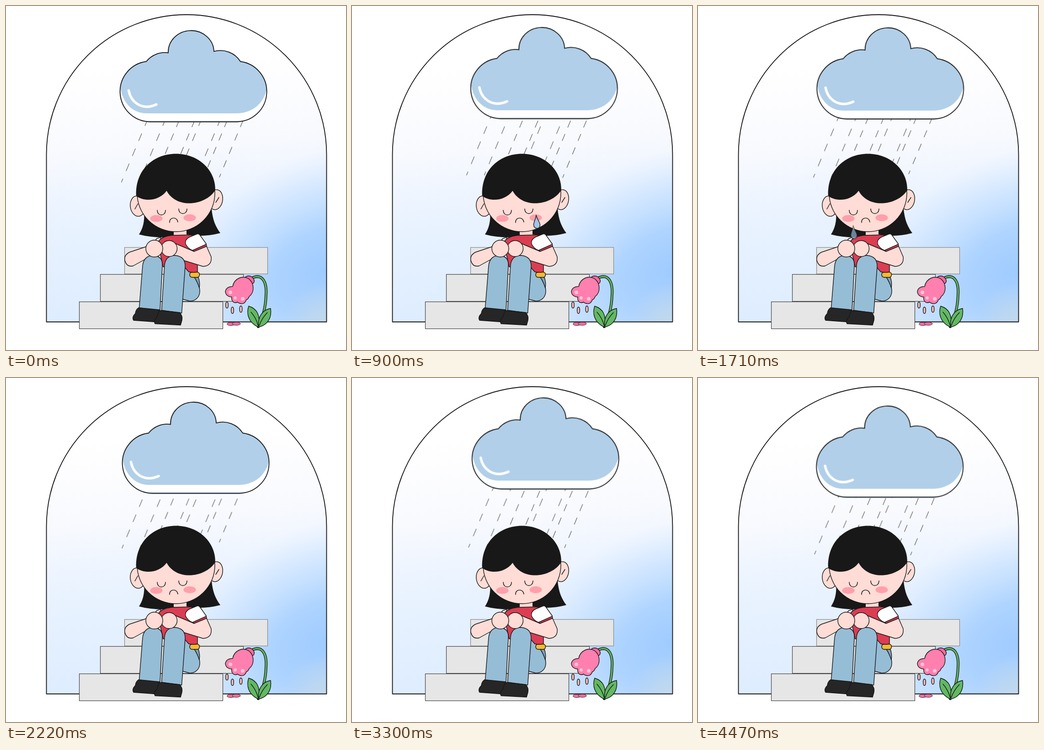
An HTML page that plays this animation: 744 by 753 pixels, repeating every 4.5 s.

```html
<!DOCTYPE html>
<html lang="en">
<head>
<meta charset="utf-8">
<title>Rainy day</title>
<style>
  html, body { margin: 0; width: 100%; height: 100%; overflow: hidden; background: #fff; }
  svg { display: block; width: 744px; height: 753px; }
  .ink { stroke: #161616; stroke-width: 1.4; stroke-linejoin: round; stroke-linecap: round; }
  .bold { stroke-width: 1.8; }
  .line { fill: none; }
  .skin { fill: #ffdcd5; }
  .hair { fill: #181818; }
  .denim { fill: #96bdd6; }
  .red { fill: #dc3d52; }
  .leaf { fill: #62b863; }
  .blush { fill: #ff9fac; }
  .rain { stroke: #777; stroke-width: 1.5; }
  .drop { fill: #9fc6e8; }
</style>
</head>
<body>
<svg viewBox="0 0 744 753">
  <defs>
    <linearGradient id="sky" gradientUnits="userSpaceOnUse" x1="370" y1="120" x2="420" y2="691">
      <stop offset="0" stop-color="#fff"/>
      <stop offset=".3" stop-color="#f9fafe"/>
      <stop offset=".55" stop-color="#eaf3ff"/>
      <stop offset="1" stop-color="#dcecff"/>
    </linearGradient>
    <radialGradient id="glow" gradientUnits="userSpaceOnUse" cx="0" cy="0" r="1"
        gradientTransform="translate(700 580) rotate(-24) scale(370 255)">
      <stop offset="0" stop-color="#9fcbff"/>
      <stop offset=".35" stop-color="#a5cfff" stop-opacity=".85"/>
      <stop offset=".7" stop-color="#b4d7ff" stop-opacity=".42"/>
      <stop offset="1" stop-color="#c4deff" stop-opacity="0"/>
    </radialGradient>
    <radialGradient id="corner" gradientUnits="userSpaceOnUse" cx="701" cy="700" r="95">
      <stop offset="0" stop-color="#c4d9ea"/>
      <stop offset="1" stop-color="#c4d9ea" stop-opacity="0"/>
    </radialGradient>
    <path id="arch" d="M88.5 691.5V325A306.5 306 0 0 1 701.5 325V691.5Z"/>
    <path id="puff" d="M307 121.5A66.3 66.3 0 0 0 315 253.5H506A66.3 66.3 0 0 0 513 121.5A52 52 0 0 0 455 99.5A50 47.2 0 0 0 355 102.5A52 52 0 0 0 307 121.5Z"/>
    <path id="tear" d="M0 0C2 9 8 15 8.5 21C8.5 26 6 29 2.5 29C-2 29-5.5 26-5.5 21C-5.5 15-1 9 0 0Z"/>
    <path id="stem" d="M537 596C561 584 571 604 569 633Q568 670 552 702"/>
  </defs>

  <use href="#arch" fill="url(#sky)"/>
  <use href="#arch" fill="url(#glow)"/>
  <use href="#arch" fill="url(#corner)"/>
  <use href="#arch" class="ink line bold"/>

  <g fill="#e6e6e6" stroke="#444" stroke-width="1.2">
    <rect x="259.5" y="528.5" width="313" height="58" stroke="#888"/>
    <rect x="206.5" y="587.5" width="313" height="59"/>
    <rect x="160.5" y="647.5" width="314" height="59"/>
  </g>

  <g id="rainA" class="rain"></g>
  <g id="rainB" class="rain"></g>

  <g id="cloud">
    <use href="#puff" fill="#b1cfe9"/>
    <path fill="#fff" d="M250 177C255 213 278 235 308 235H503C541 235 565 212 572 177C573 222 545 251.500 506 251.500H315C276 251.500 249 222 250 177Z"/>
    <use href="#puff" class="ink line bold"/>
    <path d="M268.5 185C274 213 300 229 329 215.5" fill="none" stroke="#fff" stroke-width="5.5" stroke-linecap="round"/>
  </g>

  <!-- head -->
  <path class="hair" d="M302 450C304 472 299 488 291 500Q320 508 360 506L395 500Q430 507 469 497C459 484 452 468 450 444Z"/>
  <g class="ink skin">
    <ellipse cx="288" cy="438" rx="16" ry="22.5" transform="rotate(-8 288 438)"/>
    <ellipse cx="459" cy="424" rx="15" ry="22" transform="rotate(9 459 424)"/>
    <path d="M288.500 433L282 444.500M466 432L459 421" class="line" visibility="hidden"/>
    <path d="M288.500 433L282 444.500M466 419L459 430" class="line"/>
    <path d="M367 488H395V508H367Z" stroke="none"/>
    <ellipse cx="372" cy="410" rx="85" ry="84"/>
  </g>
  <path class="hair" d="M285 416C282 360 322 323.5 372 323.5C422 323.5 459 360 458 403C438 436 374 446 351.5 404.5C335 427 303 429 285 416Z"/>
  <g class="blush">
    <ellipse cx="329" cy="465" rx="13.500" ry="7.5"/>
    <ellipse cx="402" cy="463.5" rx="13.5" ry="7.5"/>
  </g>
  <path class="ink line" d="M331 447C331 461 349 461 349 447M378 444C378 458 396 458 396 444M358 474C357 461 375 461 376 473"/>

  <!-- body -->
  <path class="ink denim" d="M384 552C398 578 424 600 424 624C424 638 414 646 402 646L384 641Z"/>
  <path class="ink" fill="#7fa3bd" d="M411 592L421 594Q425 605 423 617Q419 604 411 592Z"/>
  <rect class="ink" x="402" y="582.5" width="21.5" height="11.5" rx="5.5" fill="#f6b931"/>
  <path class="ink" fill="#e9f0fa" d="M323 517L330 509L339 506L336 520Z"/>
  <path class="ink red" d="M332 518Q338 505 362 502L405 501L428 515L419 556V582Q410 584 400 582L392 573L344 571Z"/>
  <path class="ink skin" d="M309 526L270 539Q258 545 260 557Q264 572 278 569L318 547Z"/>
  <path class="ink skin" d="M366 518L411 537L438 524L449 549Q451 569 431 570L360 548Z"/>
  <path class="ink red" d="M406 532L411 537.5L439 526L438 520Z"/>
  <path class="ink" fill="#fff" d="M401 506L418 499Q422 498 424 501L437 519Q438.500 522 435 523L408 535Q398 531 393 521Q391 511 401 506Z"/>
  <g class="ink denim">
    <path d="M291.5 661L299 568Q302 546 323 546Q344 548 342 570L337 666Z"/>
    <path d="M340.5 666L347 566Q350 546 370 546Q393 548 392 571L384.5 672Z"/>
  </g>
  <circle class="ink skin" cx="357" cy="531" r="17.5"/>
  <circle class="ink skin" cx="324.5" cy="531" r="18.5"/>
  <g class="ink" fill="#262626">
    <path d="M290 660.500L336 665L327 691.500L279 688Q275 681 283 673Q284 664 290 660.500Z"/>
    <path d="M338 666.500L380 671Q387 678 385 688L382 698.500L326 695.500Q322 688 331 680Q332 670 338 666.500Z"/>
  </g>

  <!-- flower -->
  <g class="ink">
    <use href="#stem" class="line" style="stroke-width:6"/>
    <use href="#stem" class="line" style="stroke:#62b863;stroke-width:3.4"/>
    <g class="leaf">
      <path d="M552 703C529 692 526 672 531 657C549 662 558 678 552 703Z"/>
      <path d="M553 703C550 681 561 665 579 662C582 682 573 698 553 703Z"/>
      <path class="line" d="M536 670Q547 682 552 700M572 671Q560 683 554 700"/>
    </g>
    <path fill="#f76b9f" d="M523 594Q530 588 538 593Q546 600 542 606Q538 610 533 608Z"/>
    <path fill="#ff7fae" d="M496 614C499 596 518 589 531 597C544 607 544 627 532 636Q530 642 526 643Q522 654 512 651Q508 650 507 648Q499 652 495 645Q493 641 494 637Q481 636 480 625Q482 614 496 614Z"/>
  </g>
  <g fill="#ffc3da">
    <circle cx="491" cy="627" r="4"/><circle cx="501.5" cy="639" r="3.5"/><circle cx="518" cy="641" r="4"/>
  </g>
  <g class="ink" fill="#ffbdbd">
    <ellipse cx="483.5" cy="654.5" rx="2.8" ry="6.8"/>
    <ellipse cx="495.5" cy="666" rx="2.8" ry="7"/>
    <ellipse cx="514" cy="663.5" rx="2.8" ry="7"/>
  </g>
  <g class="ink" fill="#f76b9f" style="stroke-width:.8">
    <ellipse cx="492" cy="696" rx="8.5" ry="3.6"/>
    <ellipse cx="504" cy="695.5" rx="9" ry="3.6"/>
  </g>

  <use id="tearL" href="#tear" class="ink drop"/>
  <use id="tearR" href="#tear" class="ink drop"/>
</svg>

<script>
const LOOP = 4500;
const SLANT = 0.417;
const TEAR_EVERY = 1400;
const TEAR_FALL = 830;
const $ = id => document.getElementById(id);

// Dashed lines slanting down from each x at the top to y = end.
function addRain(id, xs, top, end, dash, gap) {
  const k = Math.hypot(1, SLANT);
  $(id).innerHTML = xs.map(x =>
    `<line x1="${x}" y1="${top}" x2="${x - SLANT * (end - top)}" y2="${end}"
      stroke-dasharray="${dash * k} ${gap * k}"/>`).join("");
}

// Poses are [ms, x, y, opacity]; the last one is held to the end.
function play(id, poses) {
  const hold = [LOOP, ...poses.at(-1).slice(1)];
  const frames = [...poses, hold].map(([t, x, y, o = 1]) => ({
    offset: t / LOOP, transform: `translate(${x}px, ${y}px)`, opacity: o
  }));
  $(id).animate(frames, { duration: LOOP, iterations: Infinity });
}

// A tear appears at once, then slides down and fades; this happens twice.
function weep(id, first, x, y, drift, drop) {
  const poses = [[0, x, y, 0]];
  for (const t of [first, first + TEAR_EVERY]) {
    poses.push([t, x, y, 0], [t, x, y, 1], [t + TEAR_FALL, x + drift, y + drop, 0]);
  }
  play(id, poses);
}

addRain("rainA", [310.8, 349.8, 428.4, 470], 246, 386, 16.3, 16.7);
addRain("rainB", [379, 413, 484.3, 519], 250, 375, 15, 14.3);

play("cloud", [[0, 0, 0], [1320, 15, -10], [2220, 5, -1], [3540, 15, -12.5], [4470, 9.6, 7.5]]);
play("rainA", [[0, 0, 0], [900, -2, -15.5], [1710, 0, -10.5], [2700, 2.5, -15.5], [3300, 2.5, -15], [4320, 2.5, 0]]);
play("rainB", [[0, 0, 0], [900, -6, 1], [1710, -6, -7], [2700, 5, -23], [3300, -2, -3], [4320, -2, 13]]);
weep("tearL", 0, 340, 460, -1, 55);
weep("tearR", 880, 403, 457, -2, 32);
</script>
</body>
</html>
```
